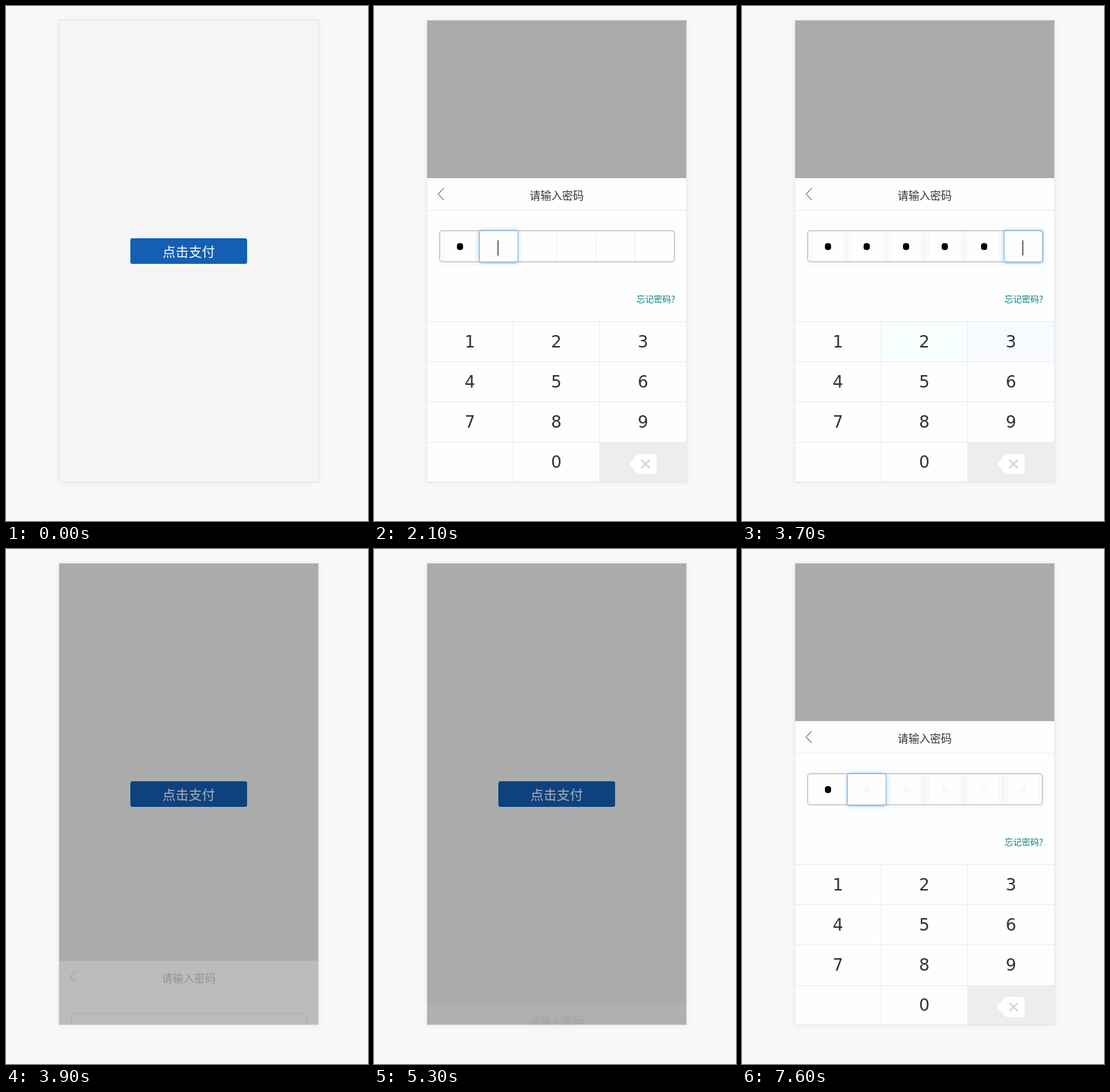
An HTML page that plays this animation: 524x745 px, repeating every 8 s.

```html
<!DOCTYPE html>
<html lang="zh">
<head>
<meta charset="utf-8">
<title>支付密码</title>
<style>
* { box-sizing: border-box; }
html, body { margin: 0; width: 100%; height: 100%; overflow: hidden; background: #f9f9f9; }
body { position: relative; font-family: "Noto Sans CJK SC", "Noto Sans CJK", sans-serif; color: #333; }
div, svg { position: absolute; }

/* Every animated part shares one 8 s clock with hard steps: 1.25% = 100 ms */
.mask, .panel, .dots, .rings, .ghosts, .focus, .caret, .tap {
  animation: 8s step-end infinite;
}

.card {
  left: 76px; top: 20px; width: 377px; height: 669px;
  border: 1px solid #e3e3e3; background: #f5f5f5;
  box-shadow: 0 1px 10px rgba(0, 0, 0, .06);
}
.screen { inset: 0; overflow: hidden; }
.pay {
  left: 103px; top: 315px; width: 169px; height: 37px; border-radius: 3px;
  background: #135fb4; color: #fff; font-size: 19px; line-height: 37px; text-align: center;
}
.mask { inset: 0; background: rgba(0, 0, 0, .3); animation-name: mask; }
.panel { left: 0; top: 228px; width: 375px; height: 439px; background: #fefefe; animation-name: panel; }
.title {
  left: 0; top: 0; width: 375px; height: 47px; border-bottom: 1px solid #ebebeb;
  font-size: 15.7px; line-height: 50px; text-align: center;
}
.back { left: 14px; top: 13px; }
.forgot { right: 16px; top: 165px; font-size: 12.5px; line-height: 19px; color: #068077; white-space: nowrap; }

/* Six-cell password field */
.strip { left: 18.6px; top: 75px; width: 339px; height: 48px; display: flex; }
.strip i { flex: none; width: 56.5px; height: 100%; }
.lines { top: 77px; height: 47px; }
.lines i + i { position: relative; }
.lines i:not(:last-child) { border-right: 1px solid #eee; }
.dots i::before, .ghosts i::before {
  content: ""; display: block; width: 9px; height: 10px; margin: 19px 0 0 24px;
  border-radius: 4px; background: #000;
}
.ghosts i::before { background: #f8f8f8; }
.rings { top: 77px; height: 50px; }
.rings i { border: solid #fafafa; border-width: 2px 7px 6px; }
.frame { left: 17px; top: 75px; width: 342px; height: 47px; border: 2px solid #d2d2d2; border-radius: 5px; }
.focus {
  left: 19px; top: 75px; width: 57px; height: 48px; border: 1px solid #72b6ee; border-radius: 4px;
  box-shadow: 0 0 5px rgba(90, 170, 235, .5); animation-name: focus;
}
.caret { left: 26px; top: 14px; width: 1px; height: 22px; background: #000; animation-name: caret; }
.dots { animation-name: dots; }
.ghosts { animation-name: ghosts; }
.rings { animation-name: rings; }

.keys {
  left: 0; top: 207px; width: 375px; display: grid;
  grid-template: 58px 58px 59px 57px / 125px 125px 125px;
  font: 24px "DejaVu Sans", sans-serif;
}
.keys span {
  position: relative; display: flex; align-items: center; justify-content: center;
  border-top: 1px solid #ebebeb; border-right: 1px solid #ebebeb;
}
.keys span:nth-child(3n) { border-right: 0; }
.keys .del { background: #ededed; }
.del svg { left: 42px; top: 16px; }

@keyframes mask {
  0%, 50% { visibility: hidden; }
  16.25%, 66.25% { visibility: visible; }
}
@keyframes panel {
  0%, 50% { transform: translateY(100%); opacity: 0; }
  16.25% { transform: translateY(304px); opacity: .3; }
  17.5%, 68.75% { transform: none; opacity: 1; }
  47.5% { transform: translateY(7%); opacity: .93; }
  48.75% { transform: translateY(79%); opacity: .21; }
  66.25% { transform: translateY(93%); opacity: .07; }
  67.5% { transform: translateY(21%); opacity: .79; }
}
@keyframes dots {
  0% { clip-path: inset(0 339px 0 0); }
  26.25%, 95% { clip-path: inset(0 282.5px 0 0); }
  30%, 90% { clip-path: inset(0 226px 0 0); }
  33.75%, 87.5% { clip-path: inset(0 169.5px 0 0); }
  38.75%, 83.75% { clip-path: inset(0 113px 0 0); }
  41.25%, 80% { clip-path: inset(0 56.5px 0 0); }
  47.5% { clip-path: inset(0); }
}
@keyframes rings {
  0%, 47.5% { clip-path: inset(0 339px 0 0); }
  26.25% { clip-path: inset(0 282.5px 0 0); }
  30% { clip-path: inset(0 226px 0 0); }
  33.75% { clip-path: inset(0 169.5px 0 0); }
  38.75% { clip-path: inset(0 113px 0 0); }
  41.25% { clip-path: inset(0 56.5px 0 0); }
  80% { clip-path: inset(0 0 0 339px); }
  83.75% { clip-path: inset(0 0 0 282.5px); }
  87.5% { clip-path: inset(0 0 0 226px); }
  90% { clip-path: inset(0 0 0 169.5px); }
  95% { clip-path: inset(0 0 0 113px); }
}
@keyframes ghosts {
  0% { visibility: hidden; }
  80% { visibility: visible; }
}
@keyframes focus {
  0% { transform: none; opacity: 1; }
  26.25%, 95% { transform: translateX(56px); opacity: 1; }
  30%, 90% { transform: translateX(113px); opacity: 1; }
  33.75%, 87.5% { transform: translateX(169px); opacity: 1; }
  38.75%, 83.75% { transform: translateX(226px); opacity: 1; }
  41.25%, 80% { transform: translateX(283px); opacity: 1; }
  47.5% { transform: translateX(283px); opacity: 0; }
}
@keyframes caret {
  0%, 26.25% { opacity: 1; }
  21.25%, 47.5% { opacity: 0; }
}
@keyframes tap2 {
  0%, 50% { background: transparent; }
  30% { background: #d3eefa; }
  31.25% { background: #f8ffff; }
}
@keyframes tap3 {
  0%, 50% { background: transparent; }
  33.75% { background: #d3eefa; }
  35% { background: #e8f5fd; }
  36.25% { background: #f7fbff; }
}
@keyframes tap4 {
  0%, 40% { background: transparent; }
  38.75% { background: #d3eefa; }
}
@keyframes tap5 {
  0%, 42.5% { background: transparent; }
  41.25% { background: #d3eefa; }
}
</style>
</head>
<body>
<div class="card"><div class="screen">
  <div class="pay">点击支付</div>
  <div class="mask"></div>
  <div class="panel">
    <div class="title">请输入密码</div>
    <svg class="back" width="12" height="20" fill="none" stroke="#888" stroke-width="1.3"><path d="M10 1.5 1.8 10 10 18.5"/></svg>

    <div class="strip rings"><i></i><i></i><i></i><i></i><i></i><i></i></div>
    <div class="strip lines"><i></i><i></i><i></i><i></i><i></i><i></i></div>
    <div class="frame"></div>
    <div class="strip ghosts"><i></i><i></i><i></i><i></i><i></i><i></i></div>
    <div class="strip dots"><i></i><i></i><i></i><i></i><i></i><i></i></div>
    <div class="focus"><div class="caret"></div></div>

    <div class="forgot">忘记密码?</div>
    <div class="keys">
      <span>1</span>
      <span class="tap" style="animation-name: tap2">2</span>
      <span class="tap" style="animation-name: tap3">3</span>
      <span class="tap" style="animation-name: tap4">4</span>
      <span class="tap" style="animation-name: tap5">5</span>
      <span>6</span><span>7</span><span>8</span><span>9</span>
      <span></span><span>0</span>
      <span class="del"><svg width="40" height="29">
        <path d="M0 14.5 10.5 2Q12 0 14.5 0H37Q40 0 40 3V26Q40 29 37 29H14.5Q12 29 10.5 27Z" fill="#fff"/>
        <path d="m18 8.5 12 12m0-12-12 12" stroke="#d4d4d4" stroke-width="2.4"/>
      </svg></span>
    </div>
  </div>
</div></div>
</body>
</html>
```
